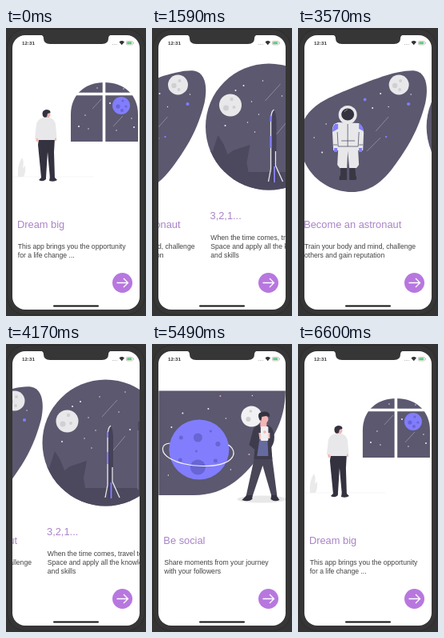
Animation of 175 by 360 pixels, one loop 6.63 s. Source, as an HTML page:

```html
<!DOCTYPE html>
<html lang="en">
<head>
<meta charset="utf-8">
<title>Onboarding carousel</title>
<style>
  html, body { margin: 0; width: 100%; height: 100%; overflow: hidden; background: #343435; }
  svg { display: block; width: 175px; height: 360px; }
  text { font-family: "Liberation Sans", Arial, sans-serif; }
  .title { font-size: 12.85px; fill: #a983c8; }
  .body { font-size: 8.65px; fill: #424242; }
  .night { fill: #5b586f; }
  .dark { fill: #4c495f; }
  .ink { fill: #34323f; }
  .suit { fill: #e8e8ea; }
  .blue { fill: #817dfc; }
  .crater { fill: #6865d4; }
  .moon { fill: #e8e8ea; }
  .pit { fill: #d0d0d4; }
  .skin { fill: #f5b5b3; }
  .streak { stroke: #a3a1b3; stroke-width: .7; fill: none; }
  .thin { fill: none; stroke: #55526a; stroke-width: .8; }
</style>
</head>
<body>
<svg viewBox="0 0 175 360">
  <defs>
    <clipPath id="screen"><rect x="8" y="9" width="159" height="343" rx="16"/></clipPath>
    <clipPath id="porthole"><circle cx="87.5" cy="123.5" r="79"/></clipPath>
  </defs>
  <rect width="175" height="360" fill="#343435"/>
  <rect x="1.5" y="1.5" width="172" height="357" rx="23" fill="#363636" stroke="#2c2c2c"/>
  <rect x="8" y="9" width="159" height="343" rx="16" fill="#fff"/>

  <g clip-path="url(#screen)">
    <g id="strip">
      <g class="page" data-title="Dream big" data-body="This app brings you the opportunity|for a life change ..."
         data-stars="91,123 99,109 103,126 130,94 138,128 157,113 160,124 114,75 147,76">
        <path d="M8 186H110" stroke="#eee" stroke-width=".6"/>
        <path d="M15 186Q14 171 20 162Q23 167 21 175L24 172Q25 180 22 186Z" fill="#eaeaea"/>
        <path class="night" d="M81 142V108C81 83 99 68 123 68S165 83 165 108V142Z"/>
        <g class="stars"></g>
        <path class="streak" d="M108 101L119 89M134 123L146 110"/>
        <circle class="blue" cx="144" cy="97" r="11"/>
        <g class="crater">
          <circle cx="140" cy="98" r="2.6"/><circle cx="146" cy="91" r="1.5"/>
          <circle cx="150" cy="98" r="1.6"/><circle cx="145" cy="103" r="2"/>
        </g>
        <path d="M80 82.5H166M122.5 67V143" stroke="#fff" stroke-width="3.6"/>
        <path class="ink" d="M41 138L40 146L44 187H50L52 155L55 188H61L60 155L61 138Z"/>
        <path class="ink" d="M45 186L41 190Q46 193 50 189V186ZM55 186L54 191Q60 193 64 190L60 186Z"/>
        <path class="skin" d="M47 107H54V114H47ZM37 137H41V142H38ZM60 136H63V141H61Z"/>
        <path class="suit" d="M47 112Q40 113 38 120L36 138H40V140H61V138L63.5 137L62 120Q60 113 54 112Z"/>
        <circle class="skin" cx="51.5" cy="108" r="4"/>
        <path class="ink" d="M46 110Q44 103 50 102Q56 102 55.5 106L52 107L51 111Q48 113 46 110Z"/>
      </g>

      <g class="page" data-title="Become an astronaut" data-body="Train your body and mind, challenge|others and gain reputation"
         data-stars="100,100 120,98.5 27,137 37,155.5 42,120 148,83 110,82">
        <path class="night" d="M9 140C9 105 32 92 67 78C102 64 132 52 153 53.5C168 56 170 75 166 94C157 128 145 148 126 174C109 197 92 205 75 205C37 205 9 175 9 140Z"/>
        <g class="stars"></g>
        <g transform="translate(7)">
          <path class="streak" d="M97 129L113 111M86 154L103 137"/>
          <circle class="moon" cx="126" cy="71" r="12.5"/>
          <g class="pit"><circle cx="121" cy="72" r="3.2"/><circle cx="128" cy="66" r="2"/><circle cx="127" cy="77" r="2"/></g>
          <g class="blue"><circle cx="83.5" cy="89.5" r="1.9"/><circle cx="138" cy="95" r="2.1"/><circle cx="110" cy="136" r="1.2"/></g>
          <path class="ink" d="M53 171H61V190H51.5Q51 185 53 184ZM64 171H71L72 184Q74 188 72 190H64Z" opacity=".85"/>
          <path class="suit" d="M50 118L45 120Q42 124 43 133L44 153H50L49 171L52 175H61L62 154L64 175H73L76 171L75 153H81L82 131Q81 122 76 119Z"/>
          <path class="thin" d="M49 130L50 148H75L76 130M62 120V148M54 141H71M44 146H49M76 146H81"/>
          <path class="blue" d="M46 120L50 120V126L43 130Q43 123 46 120ZM76 119Q81 122 82 129L76 126ZM45 150H49V155H45ZM76 150H80V155H76Z"/>
          <circle class="suit" cx="62" cy="108.5" r="11.5"/>
          <ellipse class="ink" cx="62" cy="108" rx="8" ry="7.6"/>
          <path class="streak" d="M58 105Q59 102 62 102"/>
        </g>
      </g>

      <g class="page" data-title="3,2,1..." data-body="When the time comes, travel to the|Space and apply all the knowledge|and skills"
         data-stars="56,72 80,66 112,60 33,122 61,118 70,130 46,78 104,85 75,108 118,107 152,94 66,92">
        <circle class="night" cx="87.5" cy="123.5" r="79"/>
        <g class="stars"></g>
        <path class="streak" d="M83 91L102 70M97 133L112 115"/>
        <circle class="moon" cx="39.5" cy="96.5" r="14"/>
        <g class="pit"><circle cx="34" cy="100" r="3.5"/><circle cx="41" cy="89" r="2.2"/><circle cx="44" cy="99" r="2"/></g>
        <g clip-path="url(#porthole)" class="dark">
          <path d="M4 180L10 150L17 155L24 134L31 145L36 158L43 153L64 146L60 168L62 180H175V205H4Z"/>
          <path d="M128 97H145V106H153V118H145V181H128Z"/>
        </g>
        <path d="M136 70V98M128 108V182" stroke="#8d8a9e" stroke-width=".8"/>
        <circle class="blue" cx="136" cy="69" r="2.3"/>
        <path class="blue" d="M131.5 110H140.5V115.5H131.5Z"/>
        <path d="M94 101Q97 108 97 116V193H91V113Q92 105 94 101Z" fill="#454258"/>
        <path d="M94 102Q90 105 90 115V176L87 192M96 154V172L105 192" fill="none" stroke="#e8e8ee" stroke-width="1.3"/>
        <path class="blue" d="M89 110H91V117H89ZM89 135H91V150H89ZM93.5 173H95.5V193H93.5Z"/>
      </g>

      <g class="page" data-title="Be social" data-body="Share moments from your journey|with your followers"
         data-stars="38,86.5 125,64.5 92,93 24,104 20,164 98,157 70,81">
        <path class="night" d="M8 58.5H166.5C166 88 157 111 138 134C117 164 93 189 52 189H8Z"/>
        <g class="stars"></g>
        <g fill="#dca4b6"><circle cx="85" cy="65" r="1"/><circle cx="121" cy="138" r="1"/></g>
        <ellipse cx="137" cy="194" rx="31" ry="4.5" fill="#e8e8e8"/>
        <circle class="blue" cx="58.5" cy="132" r="37.5"/>
        <g class="crater">
          <circle cx="57" cy="154" r="9.5"/><circle cx="57" cy="117" r="5.5"/><circle cx="36" cy="117" r="2.5"/>
          <circle cx="82" cy="125" r="3"/><circle cx="35" cy="145" r="2.5"/><circle cx="73" cy="109" r="1.6"/>
          <circle cx="79" cy="146" r="2.5"/><circle cx="55" cy="134" r="1.5"/>
        </g>
        <path d="M22 124C10 125 10 136 22 143C42 155 85 156 98 144C105 137 101 130 95 126" fill="none" stroke="#f4f4f7" stroke-width="1.2"/>
        <circle cx="124" cy="90.5" r="13" fill="#f1f1f3"/>
        <g class="pit"><circle cx="120" cy="94" r="3"/><circle cx="123" cy="84" r="1.8"/></g>
        <path d="M129 136L117 191H125L138 152L149 190H156L149 136Z" fill="#484657"/>
        <path class="ink" d="M118 189L112 195Q120 198 125 194V189ZM149 189L148 194Q153 198 159 195L155 189Z"/>
        <path d="M134 101Q126 103 125 111L121 126L128 132L127 144H150L149 129Q154 121 152 111Q150 103 143 101Z" fill="#3e3c4c"/>
        <path d="M134 119H144L145 140H131Z" fill="#666b9f"/>
        <path class="skin" d="M135 97H143V104H135ZM133 111H139V119H134ZM142 111H147V118H142Z"/>
        <circle class="skin" cx="140" cy="94" r="5"/>
        <path class="ink" d="M134 95Q130 86 137 85Q147 83 147 91L142 90L137 91L136 96Z"/>
        <rect x="135.5" y="103" width="9.5" height="18" rx="1.5" fill="#f0f0f2"/>
        <circle class="skin" cx="140.5" cy="110" r="1.8"/>
      </g>
    </g>

    <circle cx="145.5" cy="318.5" r="12.5" fill="#b777df"/>
    <path d="M138.5 318.5H152.5M147 313L152.5 318.5L147 324" fill="none" stroke="#fff" stroke-width="1.3"/>
    <rect x="59" y="346.5" width="57" height="2" rx="1" fill="#111"/>
    <text x="20" y="21" font-size="6.2" font-weight="bold" fill="#333">12:31</text>
    <path d="M133 20.5H139.5" stroke="#bbb" stroke-dasharray="1 1"/>
    <path d="M141.5 17.5Q144.7 14.6 148 17.5L144.7 21.3Z" fill="#333"/>
    <rect x="150.4" y="16.4" width="8.2" height="4.6" rx="1.2" fill="#fff" stroke="#aaa" stroke-width=".6"/>
    <rect x="151.2" y="17.2" width="6" height="3" rx=".6" fill="#64c878"/>
    <path d="M159.6 17.8V19.6" stroke="#aaa" stroke-width=".7"/>
  </g>
  <path d="M43 8.5Q47 9 47 13Q47 20 55 20H120Q128 20 128 13Q128 9 132 8.5Z" fill="#363636"/>
</svg>
<script>
  const LOOP = 6630, PAGE = 159, STIFFNESS = 0.01, LINE = 11;
  // [start in ms, pages moved]; a slow drag is followed by its release
  const MOVES = [
    [20, 1], [480, 1], [940, 1], [1438, -3],
    [2940, 1], [3492, 0.3], [3940, 0.7], [4660, 1], [5492, -3]
  ];

  function add(parent, tag, attrs, text = "") {
    const node = document.createElementNS("http://www.w3.org/2000/svg", tag);
    for (const key in attrs) node.setAttribute(key, attrs[key]);
    node.textContent = text;
    parent.append(node);
  }

  document.querySelectorAll(".page").forEach((page, i) => {
    const { title, body, stars } = page.dataset;
    page.setAttribute("transform", `translate(${i * PAGE})`);
    // Text is aligned to the bottom line
    const lines = body.split("|");
    const top = 287 - (lines.length - 1) * LINE;
    add(page, "text", { class: "title", x: 14, y: top - 25.7 }, title);
    lines.forEach((line, row) =>
      add(page, "text", { class: "body", x: 14.8, y: top + row * LINE }, line));
    const sky = page.querySelector(".stars");
    stars.split(" ").forEach((star, n) => {
      const [cx, cy] = star.split(",");
      add(sky, "circle", { cx, cy, r: n % 3 ? 0.7 : 1, fill: "#eeeef4" });
    });
  });

  // Critically damped spring from 0 to 1
  function spring(ms) {
    const x = Math.max(0, ms) * STIFFNESS;
    return 1 - (1 + x) * Math.exp(-x);
  }

  const strip = document.getElementById("strip");
  function draw() {
    const t = performance.now() % LOOP;
    const pos = MOVES.reduce((sum, [start, pages]) => sum + pages * spring(t - start), 0);
    strip.setAttribute("transform", `translate(${(-pos * PAGE).toFixed(2)})`);
    requestAnimationFrame(draw);
  }
  draw();
</script>
</body>
</html>
```
